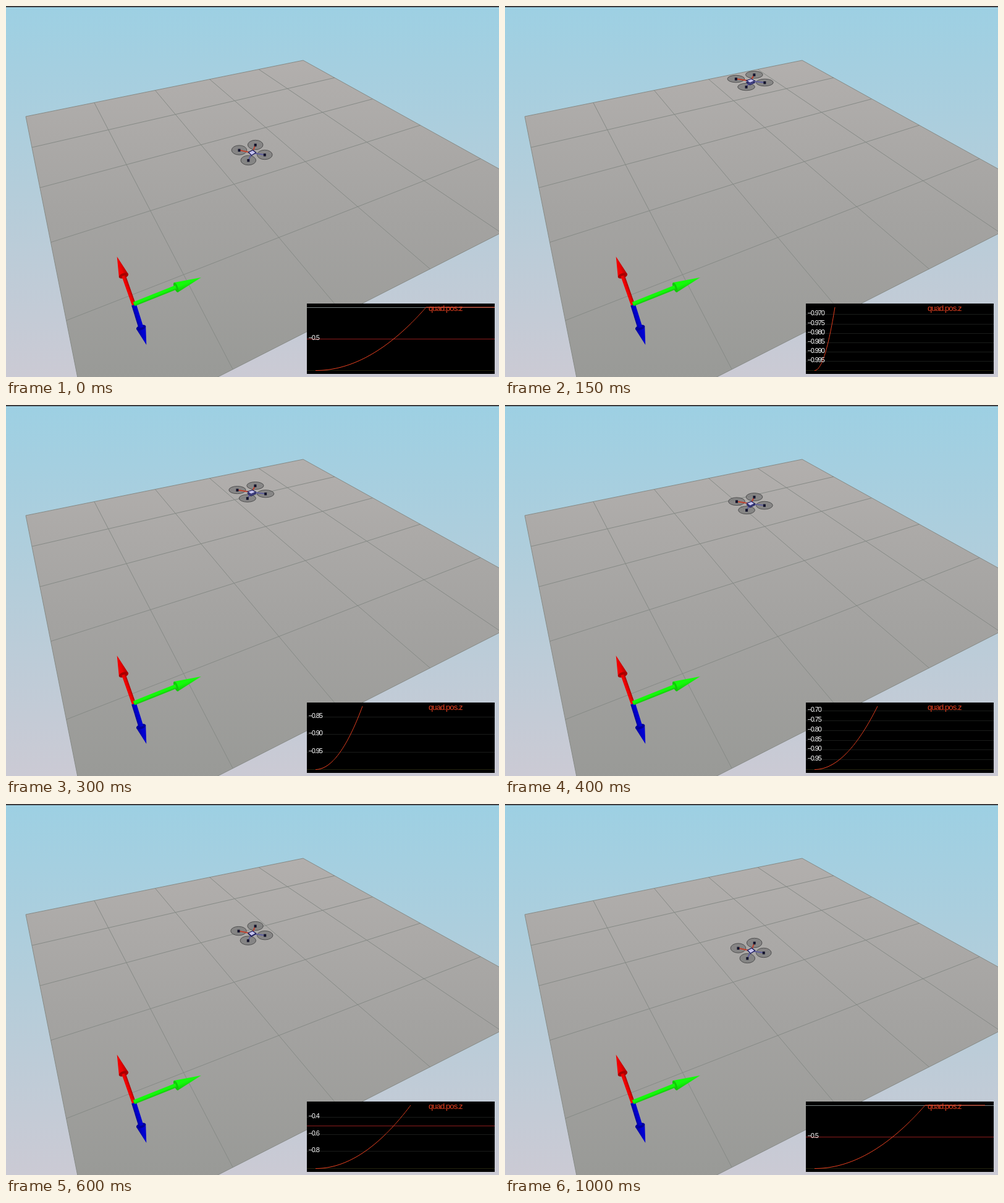
An HTML page with a canvas for the animation above (1050 ms loop, 798 by 601 pixels).

```html
<!DOCTYPE html>
<html>
<head>
<meta charset="utf-8">
<style>
html, body { margin: 0; width: 100%; height: 100%; overflow: hidden; }
canvas { display: block; }
</style>
</head>
<body>
<canvas id="stage" width="798" height="601"></canvas>
<script>
const c = document.getElementById('stage').getContext('2d');
const STEP = 50, STEPS = 21;
const FALL = 3.12e-5; // height lost per squared pixel of plot time

// plot time in pixels at a few steps, linear in between
const CLOCK = [[1, 4], [3, 33], [6, 76], [10, 128], [12, 154], [20, 276], [21, 290]];

function plotTime(n) {
  const i = CLOCK.findIndex(k => k[0] >= n);
  const [n1, x1] = CLOCK[i];
  if (n1 === n) return x1;
  const [n0, x0] = CLOCK[i - 1];
  return x0 + (x1 - x0) * (n - n0) / (n1 - n0);
}

const fallen = x => Math.min(1, FALL * x * x);

function vertical(stops, y0, y1) {
  const g = c.createLinearGradient(0, y0, 0, y1);
  stops.forEach((s, i) => g.addColorStop(i / (stops.length - 1), s));
  return g;
}

function path(points, close) {
  c.beginPath();
  points.forEach(p => c.lineTo(p[0], p[1]));
  if (close) c.closePath();
}

function line(points, color, width = 1) {
  path(points);
  c.strokeStyle = color;
  c.lineWidth = width;
  c.stroke();
}

// perspective map of the unit square onto the floor
function floorPoint(u, v) {
  const w = 1 + 0.3112 * u - 0.5798 * v;
  return [(32 + 598.7 * u + 25.4 * v) / w, (179 - 63.6 * u + 117.7 * v) / w];
}

function drawScene() {
  c.fillStyle = vertical(['#9dd0e3', '#b4cdda', '#cbcad4'], 0, 601);
  c.fillRect(0, 0, 798, 601);
  c.fillStyle = '#3b3b3d';
  c.fillRect(0, 0, 798, 2);

  path([floorPoint(0, 0), floorPoint(1, 0), floorPoint(1, 1), floorPoint(0, 1)], true);
  c.fillStyle = vertical(['#b2afad', '#a4a3a1', '#999a97'], 88, 601);
  c.fill();
  for (let i = 0; i <= 5; i++) {
    const k = i / 5;
    line([floorPoint(k, 0), floorPoint(k, 1)], '#868a86');
    line([floorPoint(0, k), floorPoint(1, k)], '#868a86');
  }
}

// shaft from (x, y) to the cone base (bx, by), cone tip at (tx, ty)
function arrow(x, y, bx, by, tx, ty, width, half, flat, light, dark) {
  const len = Math.hypot(tx - x, ty - y);
  const base = Math.hypot(bx - x, by - y);
  const shade = r => vertical([light, light, dark], -r, r);
  c.save();
  c.translate(x, y);
  c.rotate(Math.atan2(ty - y, tx - x));
  c.fillStyle = shade(half);
  path([[base, -half], [len + 1, 0], [base, half]], true);
  c.fill();
  c.fillStyle = dark;
  c.beginPath();
  c.ellipse(base, 0, flat, half, 0, 0, 7);
  c.fill();
  c.fillStyle = shade(width / 2);
  c.fillRect(0, -width / 2, base, width);
  c.restore();
}

function drawAxes() {
  arrow(207, 484, 218.5, 521, 227, 548, 8, 8, 4, '#0000d2', '#000098');
  arrow(207, 484, 190, 437, 180, 407, 6.5, 8, 4, '#f00000', '#a80000');
  arrow(207, 483, 275, 455.5, 315, 440, 7, 8.5, 3, '#14fa0a', '#10c808');
}

function drawDrone(h) {
  const cx = 398.5 - h, cy = 238 - 103.5 * h * (1 + 0.17 * h);
  const sx = 1 + 0.13 * h, sy = 1 - 0.22 * h;
  const at = (x, y) => [cx + x * sx, cy + y * sy];
  const rotors = [
    [-21, -4.5, '#c04430'], [5.2, -13, '#c04430'],
    [20.3, 3, '#60609c'], [-6.2, 12, '#60609c']
  ];
  for (const [x, y, color] of rotors) {
    const p = at(x, y);
    c.beginPath();
    c.ellipse(p[0], p[1], 12.3 * sx, 7.7 - 2 * h, 0, 0, 7);
    c.fillStyle = 'rgba(122,122,122,.75)';
    c.fill();
    c.strokeStyle = '#505050';
    c.lineWidth = 1;
    c.stroke();
    line([[cx, cy], p], color, 2);
    c.fillStyle = '#14142c';
    c.fillRect(p[0] - 2, p[1] - 2, 4, 4.5);
  }
  const box = (drop, fill) => {
    path([[-6, -1], [1, -4.5], [6, -0.5], [-1, 4]].map(([x, y]) => at(x, y + drop)), true);
    c.fillStyle = fill;
    c.fill();
    c.strokeStyle = '#20205c';
    c.lineWidth = 1.2;
    c.stroke();
  };
  box(4 * h, '#56569a');
  box(0, '#c4c2ee');
}

function tickStep(range) {
  const unit = 10 ** Math.floor(Math.log10(range)), m = range / unit;
  return unit * (m < 5 ? 0.5 : m < 7 ? 1 : 2);
}

function drawPlot(end) {
  const range = fallen(end), step = tickStep(range);
  const toY = rise => 590.5 - 102.5 * rise / range;
  const grid = (rise, color) => {
    const y = Math.floor(toY(rise)) + 0.5;
    line([[487, y], [791, y]], color);
  };
  c.save();
  c.beginPath();
  c.rect(487, 482, 304, 114);
  c.clip();
  c.fillStyle = '#000';
  c.fillRect(487, 482, 304, 114);

  const digits = Math.max(0, -Math.floor(Math.log10(step) + 1e-6));
  const ticks = Math.floor(range / step + 1e-6);
  for (let i = 1; i <= ticks; i++) grid(i * step, '#1a1c1a');
  grid(0, '#23230f');
  if (range >= 0.5) grid(0.5, '#8c1c1c');
  if (range === 1) grid(1, '#7c8484');

  const curve = [];
  for (let x = 0; x <= end; x++) curve.push([501 + x, toY(fallen(x))]);
  line(curve, '#e64020');

  c.font = '11px "Liberation Sans", Arial, sans-serif';
  c.letterSpacing = '-1.1px';
  c.fillStyle = '#fff';
  for (let i = 1; i <= ticks; i++) {
    const rise = i * step;
    if (rise < 0.9999) c.fillText('\u2212' + (1 - rise).toFixed(digits), 489.5, Math.round(toY(rise) + 1.5));
  }
  c.font = '13px "Liberation Sans", Arial, sans-serif';
  c.letterSpacing = '-0.9px';
  c.fillStyle = '#e64020';
  c.fillText('quad.pos.z', 684, 494);
  c.restore();
}

function frame() {
  const n = Math.floor(performance.now() / STEP) % STEPS || STEPS;
  const end = plotTime(n);
  drawScene();
  drawAxes();
  drawDrone(1 - fallen(end));
  drawPlot(end);
  requestAnimationFrame(frame);
}
frame();
</script>
</body>
</html>
```
